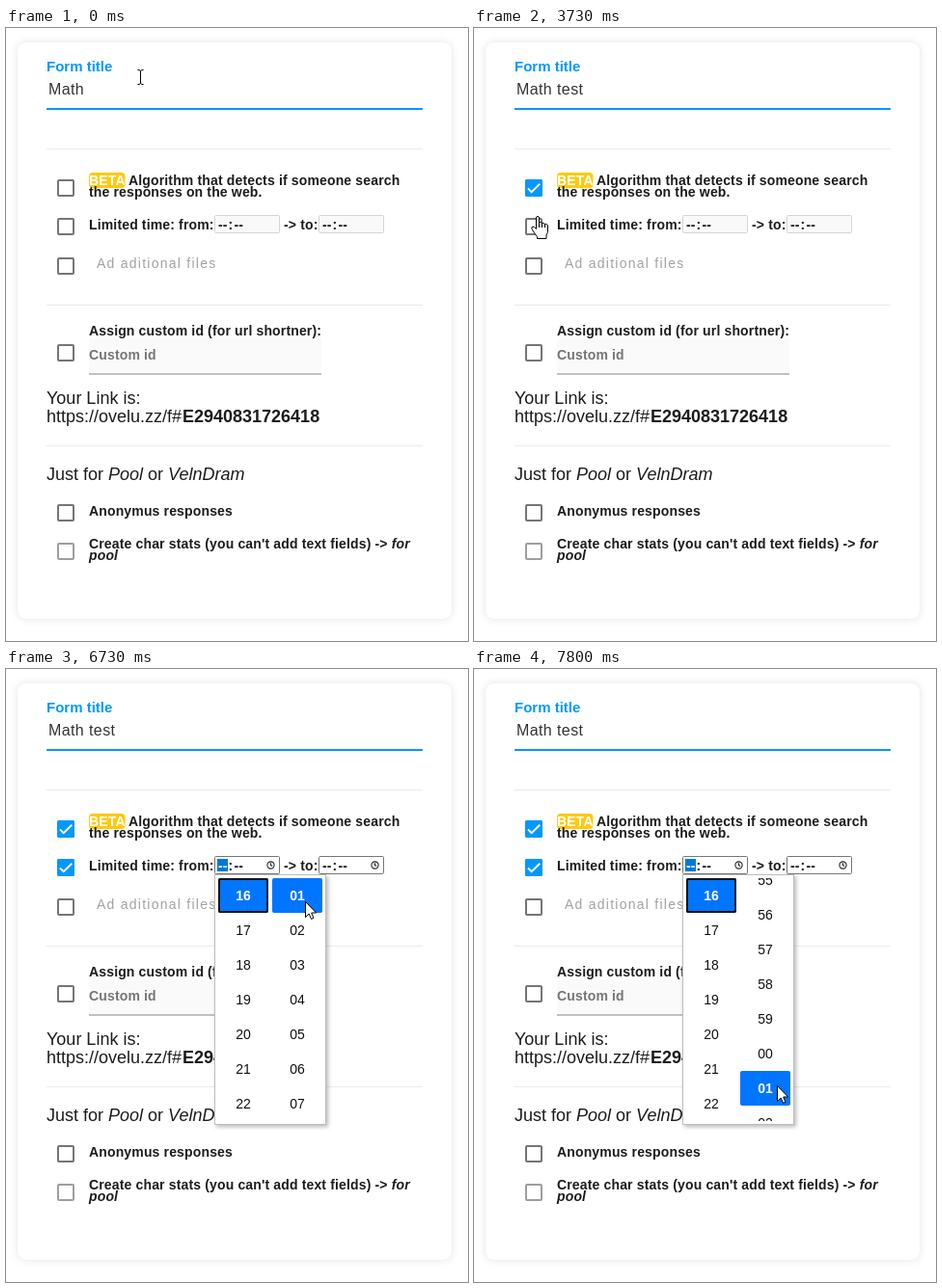
An HTML page that plays this animation: 479x636 px, repeating every 8 s.

```html
<!DOCTYPE html>
<html lang="en">
<head>
<meta charset="utf-8">
<title>Form settings</title>
<style>
  html, body { margin: 0; width: 100%; height: 100%; overflow: hidden; background: #fff; }
  svg { display: block; width: 479px; height: 636px; font-family: "Liberation Sans", Arial, sans-serif; }
  text { white-space: pre; fill: #1c1c1c; }
  .bold { font-weight: bold; font-size: 14px; letter-spacing: .15px; }
  .large { font-size: 18px; }
  .cell { font-size: 14px; text-anchor: middle; fill: #111; }
  .cell.picked { font-weight: bold; fill: #fff; }
  .card { fill: #fff; filter: drop-shadow(0 0 4px rgba(0, 0, 0, .11)); }
  .sheet { fill: #fff; stroke: #bdbdbd; filter: drop-shadow(2px 2px 2px rgba(0, 0, 0, .28)); }
  .pointer path { fill: #fff; stroke: #000; stroke-linejoin: round; }
</style>
</head>
<body>
<svg viewBox="0 0 479 636">
  <defs>
    <clipPath id="column"><rect x="276" y="217" width="52" height="252"/></clipPath>
  </defs>
  <rect class="card" x="12" y="15" width="450" height="598" rx="9"/>
  <path d="M42 125.5H432M42 287.5H432M42 433.5H432" stroke="#ebebeb"/>

  <text x="42" y="45" font-size="15" font-weight="bold" style="fill:#0398fc">Form title</text>
  <text id="title" x="44" y="69" font-size="16" letter-spacing=".4" style="fill:#333"></text>
  <rect id="caret" y="54" width="1" height="19"/>
  <rect x="42" y="83" width="390" height="2" fill="#0398fc"/>

  <g id="boxes"></g>

  <rect x="86" y="150" width="37.5" height="16" rx="4" fill="#ffc90e"/>
  <text class="bold" x="86" y="163" style="fill:#fff">BETA</text>
  <text class="bold" x="127" y="163">Algorithm that detects if someone search</text>
  <text class="bold" x="86" y="175">the responses on the web.</text>
  <text class="bold" x="86" y="209">Limited time: from:</text>
  <text class="bold" x="288" y="209">-&gt; to:</text>
  <g id="times"></g>
  <text x="94" y="249" font-size="14" letter-spacing="1.25" style="fill:#a2a2a2">Ad aditional files</text>

  <text class="bold" x="86" y="319">Assign custom id (for url shortner):</text>
  <rect x="86" y="322" width="241" height="37" fill="#fafafa"/>
  <rect x="86" y="358" width="241" height="2" fill="#c0c0c0"/>
  <text class="bold" x="86" y="344" style="fill:#757575">Custom id</text>

  <text class="large" x="42" y="390">Your Link is:</text>
  <text class="large" x="42" y="409">https://ovelu.zz/f#<tspan x="183" font-weight="bold">E2940831726418</tspan></text>
  <text class="large" x="42" y="469">Just for <tspan font-style="italic">Pool</tspan> or <tspan font-style="italic">VelnDram</tspan></text>
  <text class="bold" x="86" y="506">Anonymus responses</text>
  <text class="bold" x="86" y="540">Create char stats (you can't add text fields) -&gt; <tspan font-style="italic">for</tspan></text>
  <text class="bold" x="86" y="552" font-style="italic">pool</text>

  <g id="popup">
    <rect class="sheet" x="216.5" y="213.5" width="115" height="259"/>
    <g id="hours"></g>
    <g clip-path="url(#column)">
      <rect id="hover" x="276" width="52" height="36" rx="2" fill="#b2d4ff"/>
      <g id="minutes"></g>
    </g>
  </g>

  <g id="pointer" class="pointer">
    <g data-kind="beam">
      <path d="M-2.5 -7.5H-1L.5 -6.5L2 -7.5H3.5M.5 -6.5V6.5M-2.5 7.5H-1L.5 6.5L2 7.5H3.5" style="fill:none"/>
    </g>
    <g data-kind="arrow">
      <path d="M.5 .5V16.5L4.2 13L6.5 18.4L9 17.4L6.7 12H11.6Z"/>
    </g>
    <g data-kind="hand" transform="translate(-7 0)">
      <path d="M5.5 13.5V2Q5.5 .5 7 .5T8.5 2V7.5Q8.5 6.5 10 6.5T11.5 8Q12 7 13 7.3T14.5 9Q15 8 16 8.4T17.5 10V15Q17.5 18 16 20V23.5H6.5V21.5Q3.5 18 1 13.5Q.2 11.5 2 11Q3.5 11 5.5 13.5Z"/>
      <path d="M8.5 7.5V12M11.5 8V12M14.5 9V12" style="fill:none"/>
    </g>
  </g>
</svg>
<script>
const LOOP = 8000, FPS = 15, ROW = 36;
const BLUE = '#0398fc', PICKED = '#0075ff';
const CHECK_1 = 3270, CHECK_2 = 4130, FOCUS = 5330, OPEN = 5600;

// time, kind, x and y of the hot spot
const POINTER = [
  [0, 'beam', 139, 51], [200, 'beam', 138, 61], [270, 'none', 138, 61],
  [2600, 'beam', 138, 61], [2670, 'beam', 128, 72], [2730, 'arrow', 100, 104],
  [2870, 'hand', 59, 151], [3000, 'hand', 61, 159], [3530, 'hand', 61, 159],
  [3730, 'hand', 66, 195], [3800, 'hand', 66, 195], [3870, 'hand', 66, 198],
  [4330, 'hand', 66, 198], [4400, 'arrow', 100, 208], [4600, 'arrow', 262, 226],
  [4730, 'arrow', 288, 219], [4870, 'arrow', 274, 200], [5070, 'arrow', 273, 200],
  [5600, 'arrow', 273, 200], [6330, 'arrow', 310, 232], [6470, 'arrow', 310, 232],
  [6730, 'arrow', 310, 241], [6800, 'arrow', 310, 241], [7000, 'arrow', 308, 260],
  [7600, 'arrow', 314, 431], [7730, 'arrow', 314, 431], [7800, 'arrow', 314, 432]
];
const TYPING = [[0, 'Math'], [270, 'Math '], [1200, 'Math t'], [1270, 'Math te'], [1530, 'Math tes'], [1600, 'Math test']];
const CARET = [[0, 0], [270, 86], [870, 0], [1200, 91], [1270, 100], [1530, 109], [1600, 113], [2200, 0], [2730, 113], [CHECK_1, 0]];
const SCROLL = [[0, 0], [6870, 90], [6930, 170], [7000, 200]];

const $ = id => document.getElementById(id);
const clamp = v => Math.max(0, Math.min(1, v));
const show = (node, on) => node.style.display = on ? '' : 'none';
const latest = (steps, t) => steps.filter(s => s[0] <= t).pop();

function add(parent, tag, attrs, text = '') {
  const node = document.createElementNS('http://www.w3.org/2000/svg', tag);
  set(node, attrs);
  node.textContent = text;
  return parent.appendChild(node);
}
function set(node, attrs) {
  for (const key in attrs) node.setAttribute(key, attrs[key]);
}

function checkbox(y, checkedAt, color = '#757575') {
  const g = add($('boxes'), 'g', { transform: `translate(53 ${y})` });
  const ripple = add(g, 'circle', { cx: 9, cy: 9, fill: BLUE });
  add(g, 'rect', { x: 1, y: 1, width: 16, height: 16, rx: 1, fill: 'none', stroke: color, 'stroke-width': 2 });
  const fill = add(g, 'rect', { width: 18, height: 18, rx: 2, fill: BLUE });
  const tick = add(g, 'path', {
    d: 'M3 9.5L6.7 13.2L15.3 4.7', fill: 'none', stroke: '#fff',
    'stroke-width': 1.9, pathLength: 1, 'stroke-dasharray': '1 2'
  });
  return t => {
    const age = t - checkedAt + 30;
    show(fill, age > 0);
    show(tick, age > 60);
    set(fill, { opacity: clamp(age / 90) });
    set(tick, { 'stroke-dashoffset': 1 - clamp((age - 60) / 150) });
    set(ripple, {
      r: 12 + 8 * clamp(age / 200),
      opacity: age > 0 ? .16 * clamp(age / 75) * clamp((380 - age) / 150) : 0
    });
  };
}

function timeField(x, focusedAt) {
  const g = add($('times'), 'g', { transform: `translate(${x} 194)` });
  const frame = add(g, 'rect', { x: .5, y: .5, width: 67, height: 18, rx: 1 });
  const mark = add(g, 'rect', { x: 3, y: 3, width: 11, height: 13, fill: '#0078d7' });
  const [hour] = [[4, '--'], [14.6, ':'], [20.4, '--']].map(([dx, s]) => add(g, 'text', { class: 'bold', x: dx, y: 15 }, s));
  const clock = add(g, 'path', {
    d: 'M54.9 9.5a3.6 3.6 0 1 0 7.2 0a3.6 3.6 0 1 0 -7.2 0M58.5 7.3V9.7L60.2 10.6',
    fill: 'none', stroke: '#222', 'stroke-width': 1.1
  });
  return t => {
    const enabled = t >= CHECK_2, focused = t >= focusedAt;
    set(frame, { fill: enabled ? '#fff' : '#f9f9f9', stroke: enabled ? '#767676' : '#d5d5d5' });
    show(clock, enabled);
    show(mark, focused);
    hour.style.fill = focused ? '#fff' : '';
  };
}

function cell(parent, x, row, value, picked) {
  const y = 217 + ROW * row;
  if (picked) add(parent, 'rect', { x: x - 26, y, width: 52, height: ROW, rx: 2, fill: PICKED });
  add(parent, 'text', { class: picked ? 'cell picked' : 'cell', x, y: y + 23 }, String(value).padStart(2, '0'));
}

const parts = [
  checkbox(157, CHECK_1), checkbox(197, CHECK_2), checkbox(238, Infinity), checkbox(328, Infinity),
  checkbox(494, Infinity), checkbox(534, Infinity, '#9e9e9e'),
  timeField(216, FOCUS), timeField(324, Infinity)
];
for (let i = 0; i < 7; i++) cell($('hours'), 246, i, 16 + i, i === 0);
add($('hours'), 'rect', { x: 221, y: 218, width: 50, height: 34, rx: 1, fill: 'none', stroke: '#101010', 'stroke-width': 2 });
for (let i = -6; i < 8; i++) cell($('minutes'), 302, i, (i + 61) % 60, i === 0);

function pointerAt(t) {
  const from = latest(POINTER, t);
  const to = POINTER[POINTER.indexOf(from) + 1] || from;
  const k = to === from ? 0 : (t - from[0]) / (to[0] - from[0]);
  const mix = i => Math.round(from[i] + (to[i] - from[i]) * k);
  return { kind: from[1], x: mix(2), y: mix(3) };
}

function render(t) {
  parts.forEach(update => update(t));
  $('title').textContent = latest(TYPING, t)[1];
  const caretX = latest(CARET, t)[1];
  show($('caret'), caretX);
  set($('caret'), { x: caretX });

  const { kind, x, y } = pointerAt(t);
  set($('pointer'), { transform: `translate(${x} ${y})` });
  for (const shape of $('pointer').children) show(shape, shape.dataset.kind === kind);

  const scroll = latest(SCROLL, t)[1];
  const row = Math.floor((y - 217 - scroll) / ROW);
  show($('popup'), t >= OPEN);
  set($('minutes'), { transform: `translate(0 ${scroll})` });
  show($('hover'), x >= 276 && y >= 217 && row !== 0);
  set($('hover'), { y: 217 + scroll + ROW * row });
}

const start = performance.now();
function tick() {
  const elapsed = (performance.now() - start) % LOOP;
  const step = Math.floor(elapsed * FPS / 1000 + .05);
  render(Math.round(step * 100 / FPS) * 10);
  requestAnimationFrame(tick);
}
tick();
</script>
</body>
</html>
```
